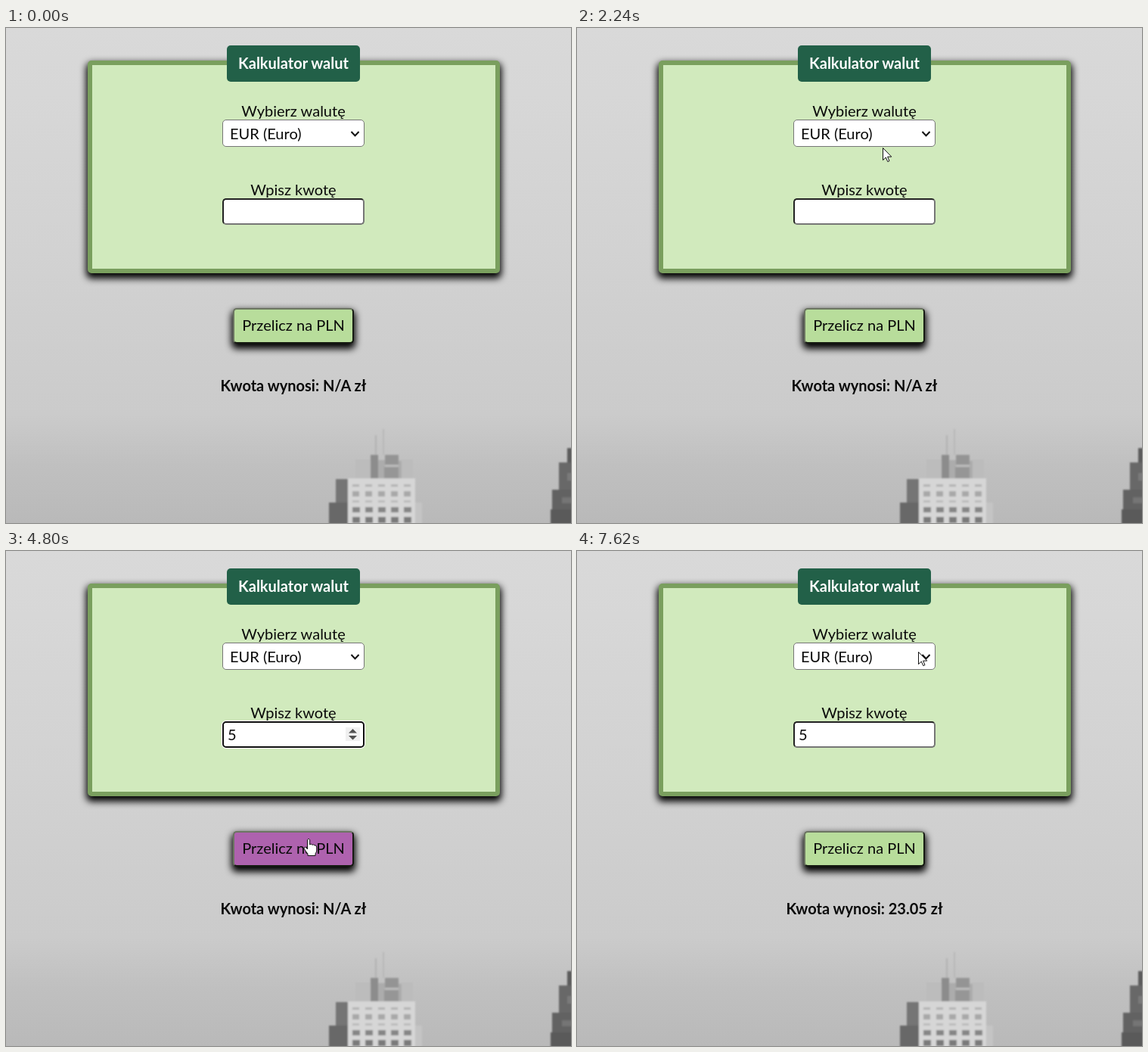
Write an HTML page that moves like this. It is 747x654 px and loops after 8 s.

```html
<!DOCTYPE html>
<html lang="pl">
<head>
<meta charset="utf-8">
<title>Kalkulator walut</title>
<style>
  html, body { margin: 0; width: 100%; height: 100%; overflow: hidden; background: #cdcdcd; }
  #stage { position: absolute; left: 0; top: 0; width: 747px; height: 654px; overflow: hidden; }
  #stage > * { position: absolute; box-sizing: border-box; border-radius: 5px; }
  #stage > svg { left: 0; top: 0; border-radius: 0; }
  #card { left: 108px; top: 43px; width: 545px; height: 281px; background: #d1eabd; border: 6px solid #7a9f5e; box-shadow: 0 5px 10px 2px #000; }
  #legend { left: 292px; top: 23px; width: 176px; height: 48px; background: #226048; }
  #select { left: 286px; top: 121px; width: 188px; height: 36px; background: #fff; border: 1px solid #767676; }
  #input { left: 286px; top: 225px; width: 188px; height: 35px; background: #fff; border: 2px solid; border-color: #222 #767676 #767676 #222; }
  #input.focus { border-color: #101010; box-shadow: 0 0 0 1px #fff; }
  #button { left: 300px; top: 369.5px; width: 160px; height: 47px; border: 2px solid; border-color: #6c7562 #161a12 #161a12 #6c7562; box-shadow: 0 5px 10px 2px #000; }
  text { font: 20px Lato, sans-serif; fill: #0a0a0a; }
  .mid { text-anchor: middle; }
  .bold { font-weight: 700; }
</style>
</head>
<body>
<div id="stage">
  <svg width="747" height="654">
    <defs>
      <linearGradient id="sky" x2="0" y2="1">
        <stop offset="0" stop-color="#d9d9d9"/>
        <stop offset=".45" stop-color="#d2d2d2"/>
        <stop offset=".78" stop-color="#cbcbcb"/>
        <stop offset=".88" stop-color="#c0c0c0"/>
        <stop offset="1" stop-color="#b9b9b9"/>
      </linearGradient>
      <filter id="soft"><feGaussianBlur stdDeviation="1"/></filter>
    </defs>
    <rect width="747" height="654" fill="url(#sky)"/>
    <g id="city" filter="url(#soft)"></g>
  </svg>
  <div id="card"></div>
  <div id="legend"></div>
  <div id="select"></div>
  <div id="input"></div>
  <div id="button"></div>
  <svg width="747" height="654">
    <text class="mid bold" x="380" y="54" style="fill:#fff">Kalkulator walut</text>
    <text class="mid" x="380" y="117">Wybierz walutę</text>
    <text x="296" y="147">EUR (Euro)</text>
    <path d="M456.5 137l5 5.2 5-5.2" fill="none" stroke="#111" stroke-width="2"/>
    <text class="mid" x="380" y="221">Wpisz kwotę</text>
    <text id="amount" x="293" y="250">5</text>
    <g id="spinner">
      <rect x="449" y="233" width="19" height="18" fill="#f0f0f0"/>
      <path d="M453 240.5l5.5-5.5 5.5 5.5zM453 244l5.5 5.5 5.5-5.5z" fill="#505050"/>
    </g>
    <rect id="caret" y="231" width="1" height="23" fill="#000"/>
    <text class="mid" x="380" y="400">Przelicz na PLN</text>
    <text id="result" class="mid bold" x="380" y="480"></text>
    <g id="cursor">
      <path id="arrow" d="M.5.5V16.6L4.3 13 6.8 18.6 9 17.6 6.6 12.1H11.8Z" fill="#fff" stroke="#111"/>
      <path id="beam" d="M-3.5-7.5h3M.5-7.5h3M0-7V7M-3.5 7.5h3M.5 7.5h3" fill="none" stroke="#111" stroke-width="1.2"/>
      <path id="hand" d="M-1.5 14V1.5Q0-1 1.7 1.5V8Q3.5 6.3 5 8.3 6.8 7 8 9 10.5 8 10.7 11V16Q10.5 18 9 20V22.5H-1V20Q-3 18-5.7 13.5-6 10.5-3.4 11.6Z" fill="#fff" stroke="#111" stroke-linejoin="round"/>
    </g>
  </svg>
</div>
<script>
const LOOP = 8000;
const $ = id => document.getElementById(id);
const show = (id, on) => { $(id).style.display = on ? '' : 'none'; };
const mix = (a, b, k) => a + (b - a) * k;
const within = (v, a, b) => v >= a && v < b;
const ramp = (t, a, b) => Math.min(1, Math.max(0, (t - a) / (b - a)));

// Each pointer move: number of steps, then points of time, x, y.
const moves = [
  [2, [170, 635, 637], [240, 606, 571]],
  [14, [460, 603, 563], [960, 515, 312], [1260, 477, 246], [1320, 456, 213]],
  [8, [1480, 452, 208], [1700, 420, 167], [1910, 404, 148]],
  [5, [2240, 404, 158], [2450, 411, 226], [2520, 412, 238]],
  [10, [4390, 411, 245], [4600, 403, 332], [4790, 400, 380], [5000, 400, 380]],
  [12, [6320, 392, 360], [6730, 390, 262], [7070, 429, 168]],
  [8, [7140, 432, 162], [7400, 446, 140], [7620, 451, 133]]
];

function pointer(t) {
  const move = moves.filter(m => t >= m[1][0]).pop();
  if (!move) return null;
  const [steps, ...pts] = move;
  const start = pts[0][0], last = pts[pts.length - 1];
  if (t >= last[0]) return [last[1], last[2]];
  const gap = (last[0] - start) / (steps - 1);
  const held = start + Math.floor((t - start) / gap) * gap;
  const i = pts.findIndex(p => p[0] > held);
  const a = pts[i - 1], b = pts[i], k = (held - a[0]) / (b[0] - a[0]);
  return [mix(a[1], b[1], k), mix(a[2], b[2], k)];
}

function buildCity() {
  const block = (x, y, w, h, v) =>
    `<rect x="${x}" y="${y}" width="${w}" height="${h}" fill="rgb(${v},${v},${v})"/>`;
  let s = block(488, 538, 2, 26, 178) + block(498, 530, 2, 34, 184) + block(462, 570, 76, 26, 188)
    + block(482, 564, 10, 32, 140) + block(492, 571, 9, 25, 172) + block(501, 564, 18, 13, 148)
    + block(500, 580, 19, 16, 150) + block(519, 572, 4, 24, 172)
    + block(436, 596, 17, 60, 116) + block(427, 627, 26, 30, 104)
    + block(452, 595, 89, 62, 214) + block(541, 627, 9, 30, 196);
  for (let c = 0; c < 5; c++) {
    const x = 458 + c * 17;
    s += block(x, 603, 9, 3, 178) + block(x, 612, 9, 7, 168) + block(x, 624, 9, 3, 188)
      + block(x, 633, 10, 7, 134) + block(x, 646, 10, 8, 122);
  }
  s += block(742, 555, 10, 100, 92) + block(731, 574, 20, 82, 104) + block(722, 610, 30, 46, 98)
    + block(720, 636, 30, 20, 90) + block(742, 588, 8, 10, 122) + block(735, 620, 14, 8, 116);
  $('city').innerHTML = s;
}

function draw(t) {
  const focus = within(t, 3020, 5230);
  $('input').className = focus ? 'focus' : '';
  show('amount', t >= 3910);
  show('spinner', within(t, 1480, 1550) || within(t, 2400, 5230) || within(t, 6660, 6930));
  show('caret', within(t, 3020, 3580) || within(t, 3910, 4440) || within(t, 4970, 5230));
  $('caret').setAttribute('x', t < 3910 ? 293 : 304);
  $('result').textContent = `Kwota wynosi: ${t < 5330 ? 'N/A' : '23.05'} zł`;

  const hot = ramp(t, 4590, 4790) - ramp(t, 6320, 6600);
  $('button').style.backgroundColor =
    `rgb(${mix(184, 174, hot)},${mix(221, 98, hot)},${mix(155, 174, hot)})`;

  const p = pointer(t);
  show('cursor', p);
  if (!p) return;
  const [x, y] = p.map(Math.round);
  const overInput = within(x, 286, 474) && within(y, 225, 260);
  const overButton = within(x, 300, 460) && within(y, 370, 417);
  show('beam', overInput);
  show('hand', overButton);
  show('arrow', !overInput && !overButton);
  $('cursor').setAttribute('transform', `translate(${x} ${y})`);
}

buildCity();
const begin = performance.now();
function tick() {
  draw((performance.now() - begin) % LOOP);
  requestAnimationFrame(tick);
}
tick();
</script>
</body>
</html>
```
